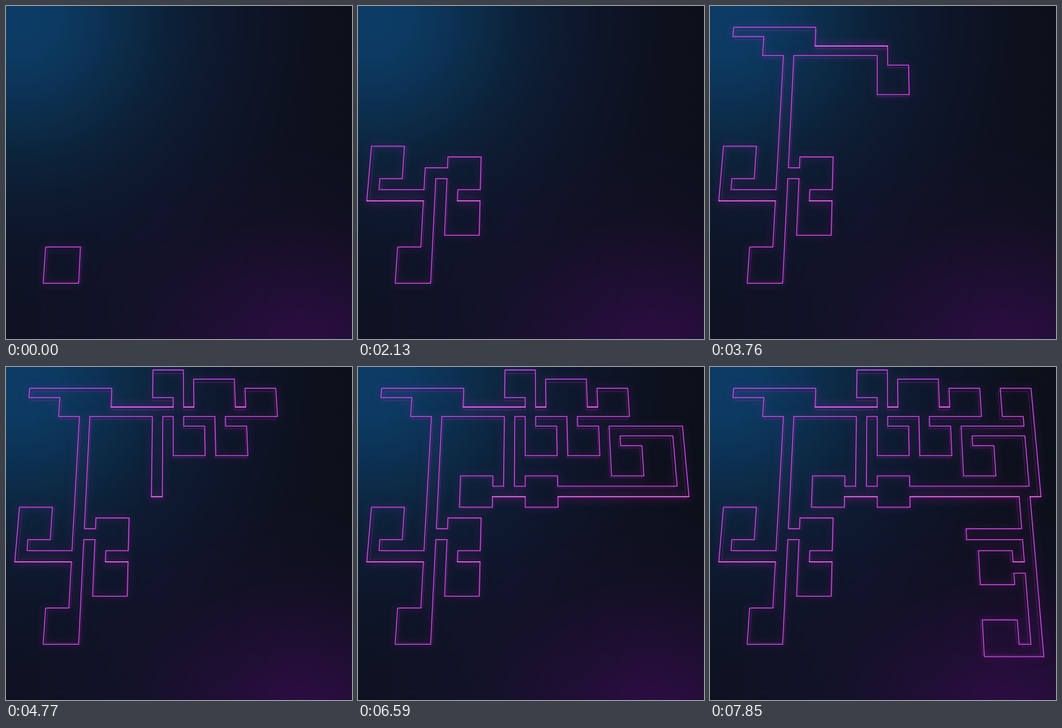
Recreate the animation shown at these times as an HTML page with a canvas. Size 762x735 px, loop 8000 ms.

```html
<!DOCTYPE html>
<html lang="en">
<head>
<meta charset="utf-8">
<title>Neon floor plan</title>
<style>
  html, body { margin: 0; width: 100%; height: 100%; overflow: hidden; }
  body {
    background:
      radial-gradient(ellipse 560px 470px at 650px 775px,
        rgba(46, 13, 70, 1) 0, rgba(42, 13, 64, .95) 14%, rgba(34, 14, 54, .75) 40%,
        rgba(25, 14, 42, .42) 66%, rgba(19, 15, 32, 0) 100%),
      radial-gradient(circle 640px at 30px 25px,
        #0c3c66 0, #0c3a61 14%, #0c3154 28%, #0c2b46 38%, #0c233b 49%,
        rgba(13, 28, 50, .9) 62%, rgba(14, 23, 44, .65) 78%, rgba(14, 18, 36, 0) 100%),
      linear-gradient(90deg, #0e1222 0, #101429 45%, #0d111d 85%, #0b101a 100%);
  }
  canvas { position: absolute; left: 0; top: 0; display: block; }
</style>
</head>
<body>
<canvas id="stage" width="762" height="735"></canvas>
<script>
const LOOP = 8000;
const ctx = document.getElementById('stage').getContext('2d');

// Floor pieces in grid cells: column, row, width, height
const room = (x, y, w = 3, h = 3) => [x, y, w, h];
const hall = (x, y, w) => [x, y, w, 1];
const shaft = (x, y, h) => [x, y, 1, h];

const batches = [
  { start: 0, gap: 0, steps: [[room(-11, 23)]] },
  { start: 1330, gap: 200, steps: [
    [shaft(-9, 18, 5), hall(-14, 18, 5)],
    [shaft(-14, 17, 1), room(-14, 14)],
    [shaft(-9, 16, 2), hall(-8, 16, 1)],
    [room(-7, 15)],
    [shaft(-7, 18, 1), room(-7, 19)]
  ] },
  { start: 2510, gap: 205, steps: [
    [shaft(-9, 4, 12)],
    [room(-11, 2, 5, 3)],
    [hall(-6, 4, 7)],
    [shaft(0, 5, 1)],
    [room(0, 6)],
    [hall(-14, 2, 3)]
  ] },
  { start: 3960, gap: 202, steps: [
    [room(-2, 0), shaft(0, 3, 1)],
    [hall(1, 4, 6), room(2, 1, 4, 3)],
    [room(7, 2)],
    [shaft(4, 5, 1), room(4, 6)],
    [shaft(-2, 5, 8)]
  ] },
  { start: 4970, gap: 202, steps: [
    [hall(-3, 12, 3)],
    [room(-6, 11)],
    [room(0, 11)],
    [hall(3, 12, 12)],
    [shaft(14, 6, 6)],
    [hall(8, 6, 6)]
  ] },
  { start: 6180, gap: 204, steps: [
    [shaft(8, 7, 1)],
    [room(8, 8)],
    [],
    [room(12, 2), shaft(14, 5, 1)],
    [shaft(13, 13, 7), hall(8, 16, 5)],
    [hall(12, 19, 1), room(9, 18)]
  ] },
  { start: 7410, gap: 220, steps: [
    [shaft(13, 20, 7)],
    [hall(12, 26, 1)],
    [room(9, 24)]
  ] }
];
const timeline = batches.flatMap(({ start, gap, steps }) =>
  steps.map((pieces, i) => ({ at: start + i * gap, pieces })));

// Tilted floor; depth below 1 gives the lower rim of the walls
function project(col, row, depth) {
  const size = 1 / (0.0448 - 0.0002456 * row);
  const x = 368.3 + col * size;
  const y = 6.5 + (size - 22.32) / 0.00613;
  return [368 + (x - 368) * depth, 450 + (y - 450) * depth];
}

function outline(pieces) {
  const cells = new Set();
  for (const [x, y, w, h] of pieces)
    for (let c = x; c < x + w; c++)
      for (let r = y; r < y + h; r++) cells.add(c + ',' + r);
  const edges = [];
  for (const key of cells) {
    const [c, r] = key.split(',').map(Number);
    const open = (dc, dr) => !cells.has((c + dc) + ',' + (r + dr));
    if (open(0, -1)) edges.push([c, r, c + 1, r]);
    if (open(0, 1)) edges.push([c, r + 1, c + 1, r + 1]);
    if (open(-1, 0)) edges.push([c, r, c, r + 1]);
    if (open(1, 0)) edges.push([c + 1, r, c + 1, r + 1]);
  }
  return edges;
}

function strokeEdges(edges, depth, color, width, glow = 0, glowColor = 'transparent') {
  ctx.beginPath();
  for (const [c1, r1, c2, r2] of edges) {
    ctx.moveTo(...project(c1, r1, depth));
    ctx.lineTo(...project(c2, r2, depth));
  }
  ctx.strokeStyle = color;
  ctx.lineWidth = width;
  ctx.shadowBlur = glow;
  ctx.shadowColor = glowColor;
  ctx.stroke();
}

const isBright = ([, r1, , r2]) => r1 === r2 && [4, 13, 19].includes(r1);

function draw(count) {
  const edges = outline(timeline.slice(0, count).flatMap(step => step.pieces));
  const bright = edges.filter(isBright);
  ctx.clearRect(0, 0, 762, 735);
  ctx.lineCap = 'round';
  strokeEdges(edges, 0.9824, 'rgba(150, 48, 178, .5)', 1);
  strokeEdges(edges, 1.002, 'rgba(84, 60, 235, .6)', 1.6);
  strokeEdges(edges, 1, '#dc44de', 1.8, 20, 'rgba(214, 50, 200, .6)');
  strokeEdges(bright, 1, '#f266f0', 2.3, 22, 'rgba(230, 60, 220, .8)');
}

let shown = 0;
function tick() {
  const time = performance.now() % LOOP;
  const count = timeline.filter(step => step.at <= time).length;
  if (count !== shown) draw(shown = count);
  requestAnimationFrame(tick);
}
tick();
</script>
</body>
</html>
```
